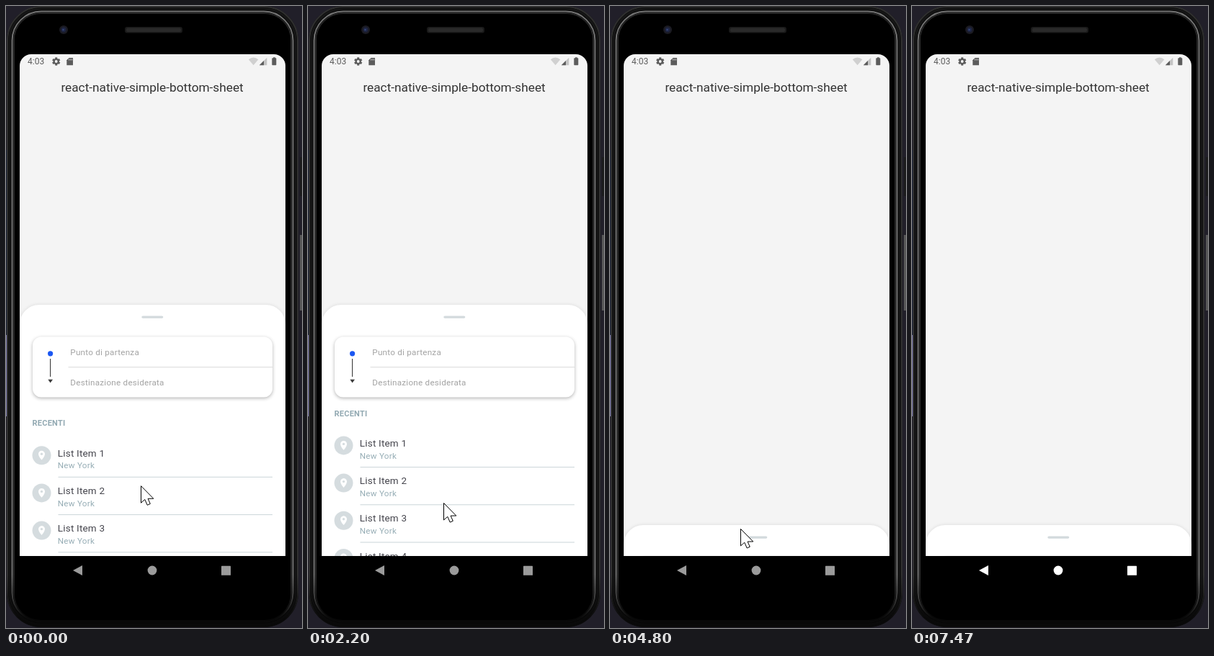
An HTML page with a canvas for the animation above (7870 ms loop, 411 by 864 pixels).

```html
<!DOCTYPE html>
<html lang="en">
<head>
<meta charset="utf-8">
<title>Bottom sheet demo</title>
<style>
html, body { margin: 0; width: 100%; height: 100%; overflow: hidden; background: #211f29; }
canvas { display: block; width: 411px; height: 864px; }
</style>
</head>
<body>
<canvas id="stage"></canvas>
<script>
const W = 411, H = 864, LOOP = 7870, STEP = 1000 / 15;
const canvas = document.getElementById('stage');
const ctx = canvas.getContext('2d');
const dpr = window.devicePixelRatio || 1;
canvas.width = W * dpr;
canvas.height = H * dpr;

const SCREEN = { x: 19, y: 67, w: 369, h: 697 };
const SHEET_TOP = 415, CLOSED = 306, ROW = 52.2, ROWS = 10, LIST_END = 365;
const NAV_TAP = 6466;

// Moves are [start, end, goal...]
const cursorMoves = [
  [0, 200, 187, 705],
  [533, 800, 188, 609],
  [1733, 2000, 188, 690],
  [2800, 3000, 186, 636],
  [3200, 3467, 186, 713],
  [4200, 4467, 181, 726],
  [4800, 5467, 159, 657],
  [5467, 6000, 113, 779],
  [7200, 7467, 100, 870]
];
const scrollMoves = [[531, 1133, LIST_END], [1733, 2267, 0]];
const sheetMoves = [[3467, 3760, CLOSED], [4800, 5467, 0], [6467, 6800, CLOSED]];
// Row number, press time, start of the return to full opacity
const presses = [[2, 400, 550], [8, 1667, 1750], [1, 3200, 3345]];

const smooth = p => (1 - Math.cos(Math.PI * p)) / 2;
const easeOut = p => 1 - (1 - p) ** 2;
const progress = (t, from, to) => Math.min(1, Math.max(0, (t - from) / (to - from)));

function follow(t, value, moves, ease) {
  for (const [from, to, ...goal] of moves) {
    const p = ease(progress(t, from, to));
    value = value.map((v, i) => v + (goal[i] - v) * p);
  }
  return value;
}

function rowAlpha(n, t) {
  const press = presses.find(([row, down]) => row === n && t >= down - 1);
  return press ? 0.2 + 0.8 * smooth(progress(t, press[2], press[2] + 250)) : 1;
}

// The picture changes 15 times a second, on times rounded to 10 ms
function snap(t) {
  let k = Math.floor((t + 5) / STEP);
  if (Math.round(k * STEP / 10) * 10 > t) k--;
  return k * STEP;
}

function rect(x, y, w, h, fill) {
  ctx.fillStyle = fill;
  ctx.fillRect(x, y, w, h);
}

function round(x, y, w, h, r, fill) {
  ctx.beginPath();
  ctx.roundRect(x, y, w, h, r);
  ctx.fillStyle = fill;
  ctx.fill();
}

function disc(x, y, r, fill) {
  ctx.beginPath();
  ctx.arc(x, y, r, 0, Math.PI * 2);
  ctx.fillStyle = fill;
  ctx.fill();
}

function poly(points, fill) {
  ctx.beginPath();
  points.forEach(([x, y]) => ctx.lineTo(x, y));
  ctx.closePath();
  ctx.fillStyle = fill;
  ctx.fill();
}

function text(str, x, y, font, fill, spacing = 0) {
  ctx.font = font + ' Roboto, sans-serif';
  ctx.letterSpacing = spacing + 'px';
  ctx.fillStyle = fill;
  ctx.fillText(str, x, y);
}

function shadow(color, blur, dy) {
  ctx.shadowColor = color;
  ctx.shadowBlur = blur * dpr;
  ctx.shadowOffsetY = dy * dpr;
}

// A line around the body that fades out towards the bottom
function rim(inset, color, width) {
  const fade = ctx.createLinearGradient(0, 790, 0, 850);
  fade.addColorStop(0, color);
  fade.addColorStop(1, '#0a0a0a');
  ctx.beginPath();
  ctx.roundRect(1 + inset, inset, 405 - 2 * inset, 863 - 2 * inset, 48 - inset);
  ctx.strokeStyle = fade;
  ctx.lineWidth = width;
  ctx.stroke();
}

function drawPhone() {
  rect(0, 0, W, H, '#211f29');
  rect(0, 200, 1, 257, '#1d2438');
  rect(0, 457, 1, 113, '#8683b8');
  rect(408, 210, 3, 54, '#1b1b1c');
  rect(408, 318, 3, 105, '#565657');

  round(1, 0, 405, 863, 48, '#060606');
  rim(1, '#303030', 2);
  rim(4, '#161616', 3);
  rim(7.5, '#737373', 2);
  rim(10, '#262626', 2);
  round(12, 11, 383, 842, 36, '#000');

  disc(80, 33, 6, '#1b1b22');
  disc(80, 33, 3.4, '#1e2543');
  disc(79.5, 33, 1.3, '#364678');
  round(165, 29, 80, 8.5, 3, '#1a1a1a');
  round(167, 30.5, 76, 5.5, 2, '#2a2a2a');
}

function drawStatus() {
  const ink = '#5c5c5c';
  text('4:03', 30, 81, '12px', ink);
  disc(69.7, 77, 4.3, ink);
  for (let i = 0; i < 6; i++) {
    ctx.save();
    ctx.translate(69.7, 77);
    ctx.rotate(i * Math.PI / 3);
    rect(-1.5, -5.6, 3, 3, ink);
    ctx.restore();
  }
  disc(69.7, 77, 1.9, '#f4f4f4');
  poly([[87.5, 72], [93, 72], [93, 82.3], [84.3, 82.3], [84.3, 75.2]], ink);
  for (let x = 87; x < 92; x += 2) rect(x, 73.5, 1, 2, '#d0d0d0');

  ctx.beginPath();
  ctx.moveTo(343.6, 82.3);
  ctx.lineTo(336.8, 74.2);
  ctx.quadraticCurveTo(343.6, 68.8, 350.4, 74.2);
  ctx.fill();
  poly([[362.3, 71.8], [362.3, 82.3], [351.8, 82.3]], '#c4c4c4');
  poly([[358, 76.1], [358, 82.3], [351.8, 82.3]], ink);
  rect(371, 71.3, 2.8, 2, ink);
  round(369.3, 72.3, 6, 10, 0.7, ink);
}

function drawPin(x, y) {
  disc(x, y, 13, '#d5dcdf');
  ctx.beginPath();
  ctx.arc(x, y - 2, 4.5, Math.PI * 0.93, Math.PI * 0.07);
  ctx.bezierCurveTo(x + 4, y + 1.8, x + 1.2, y + 4.8, x, y + 6.3);
  ctx.bezierCurveTo(x - 1.2, y + 4.8, x - 4, y + 1.8, x - 4.4, y - 1);
  ctx.fillStyle = '#fff';
  ctx.fill();
  disc(x, y - 2, 1.7, '#d5dcdf');
}

function drawRow(n, y, alpha) {
  ctx.globalAlpha = alpha;
  drawPin(49.5, y + 3.2);
  text('List Item ' + n, 71.8, y + 4.7, '13.47px', '#45454d', 0.2);
  text('New York', 71.8, y + 21.3, '11.67px', '#97aeb6', 0.25);
  rect(72.5, y + 32.8, 297.5, 1.1, '#cfd9dc');
  ctx.globalAlpha = 1;
}

function drawCard() {
  ctx.save();
  shadow('rgba(0,0,0,0.3)', 5, 1.5);
  round(37, 459.5, 333, 84, 12, '#fff');
  ctx.restore();
  disc(61.6, 482.8, 3.6, '#1b57f2');
  rect(61, 490, 1.1, 25, '#3c3c3c');
  poly([[58.3, 518.8], [65, 518.8], [61.6, 523.6]], '#3c3c3c');
  rect(86.5, 501.2, 283.5, 1, '#dadada');
  text('Punto di partenza', 89.3, 485.4, '11.67px', '#a3a3a3', 0.25);
  text('Destinazione desiderata', 89.3, 527.3, '11.67px', '#a3a3a3', 0.25);
}

function drawSheet(t) {
  const [offset] = follow(t, [0], sheetMoves, smooth);
  const [scroll] = follow(t, [0], scrollMoves, smooth);
  ctx.save();
  ctx.translate(0, offset);
  ctx.save();
  shadow('rgba(0,0,0,0.11)', 5, 0);
  round(19, SHEET_TOP, 369, 400, [27, 27, 0, 0], '#fff');
  ctx.restore();
  round(188.3, 430.4, 30, 3.4, 1.7, '#d3dadd');
  drawCard();

  ctx.beginPath();
  ctx.rect(19, 560.5, 369, 300);
  ctx.clip();
  text('RECENTI', 36.5, 583.3 - scroll, 'bold 11px', '#92a9b2', 0.25);
  for (let n = 1; n <= ROWS; n++) {
    drawRow(n, 621 + (n - 1) * ROW - scroll, rowAlpha(n, t));
  }
  ctx.restore();
}

function drawNav(color) {
  poly([[93, 784], [106, 777], [106, 791]], color);
  disc(203, 784, 6.4, color);
  round(299, 777.8, 13, 13, 0.6, color);
}

function drawCursor(x, y) {
  ctx.save();
  ctx.translate(x + 0.5, y + 0.5);
  poly([[0, 0], [0, 23.5], [5.3, 18.8], [8.7, 26.6], [12.8, 24.8], [9.6, 17.6], [17.3, 17.6]], '#fff');
  ctx.strokeStyle = '#000';
  ctx.lineWidth = 1;
  ctx.stroke();
  ctx.restore();
}

function draw(now) {
  const t = snap(now % LOOP) + 0.5;
  ctx.setTransform(dpr, 0, 0, dpr, 0, 0);
  drawPhone();

  ctx.save();
  round(SCREEN.x, SCREEN.y, SCREEN.w, SCREEN.h, [16, 16, 0, 0], '#f4f4f4');
  ctx.clip();
  drawStatus();
  text('react-native-simple-bottom-sheet', 76.4, 119, '17.25px', '#333');
  drawSheet(t);
  ctx.restore();

  drawNav(t < NAV_TAP ? '#9b9b9b' : '#fff');
  drawCursor(...follow(t, [187, 666], cursorMoves, easeOut));
}

let start = null;
function tick(now) {
  if (start === null) start = now;
  draw(now - start);
  requestAnimationFrame(tick);
}
draw(0);
requestAnimationFrame(tick);
</script>
</body>
</html>
```
